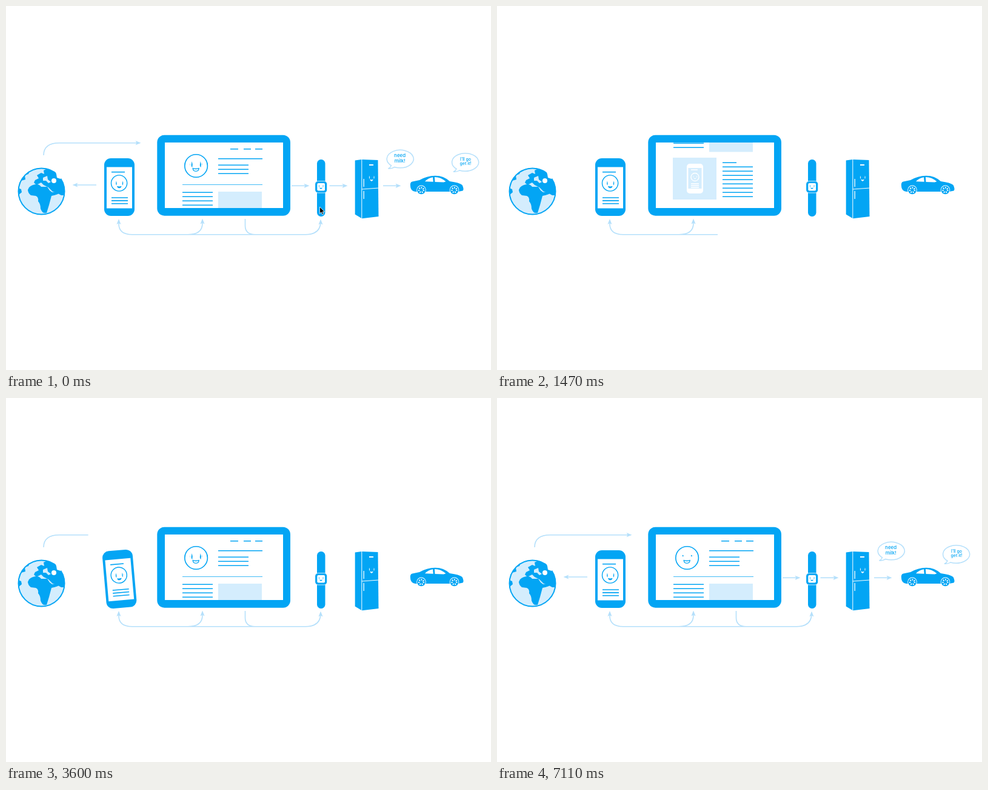
An HTML page that plays this animation: 800x600 px, repeating every 7.14 s.

```html
<!DOCTYPE html>
<html lang="en">
<head>
<meta charset="utf-8">
<title>Connected devices</title>
<style>
  html, body { margin: 0; width: 100%; height: 100%; overflow: hidden; background: #fff; }
  svg { display: block; width: 100vw; height: 100vh; }
  .b { fill: #03a5f4; }
  .p { fill: #d4edfd; }
  .w { fill: #fff; }
  .l { fill: none; stroke: #03a5f4; stroke-width: 1.6; }
  .wl { fill: none; stroke: #fff; stroke-width: 1.3; }
  .a { fill: none; stroke: #b5e0fb; stroke-width: 1.6; }
  .h { fill: #b5e0fb; }
  text { font-family: Inter, "Open Sans", sans-serif; font-weight: 500; fill: #03a5f4; text-anchor: middle; }
</style>
</head>
<body>
<svg viewBox="0 0 800 600">
  <defs>
    <clipPath id="globeClip"><circle cx="58.5" cy="305.5" r="38.5"/></clipPath>
    <clipPath id="screenClip"><rect x="262" y="225" width="195" height="108"/></clipPath>
    <path id="head" class="h" d="M0 0L-9 -3.6L-7 0L-9 3.6Z"/>
    <path id="mouth" d="M-5 4.2Q0 5.8 5 4.2Q4.6 8.8 0 8.8Q-4.6 8.8 -5 4.2Z"/>
    <g id="eyes">
      <path d="M-6.6 -7.5Q-4.8 -3 -6 2.8Q-8 1.6 -7.6 -2Z M7.6 -7.5Q9.4 -3 8.2 2.8Q6.2 1.6 6.6 -2Z"/>
      <path d="M-8.6 -6Q-10.4 -3 -9.2 0L-9.5 -3Z M10 -6Q11.2 -3 10.2 0L10.3 -3Z"/>
    </g>
    <g id="landA">
      <path d="M20 300L25 302L26 307L20 312Z M22 286Q28 274 40 270L37 277L31 279L32 286L25 288Z"/>
      <path d="M48 287L54 284L51 279L58 275L63 277L62 271L70 267L98 270V312L91 312L84 308L77 306L70 299L62 295L58 291L50 295L46 291Z"/>
      <path d="M38 299Q43 294 51 294Q55 294 58 298L68 298L72 304L76 307L91 306Q87 311 75 313L71 328L67 341Q60 343 57 334Q57 326 53 322Q54 315 49 313L41 312Q36 308 36 303Z"/>
      <path class="p" d="M61 283L68 280L69 286L74 290L70 292L66 288L61 288Z"/>
    </g>
    <g id="landB">
      <path d="M25 290Q34 267 58 266L75 269L79 275L71 278L68 284Q70 294 78 298L88 303L96 310Q90 319 77 323Q64 331 48 327Q42 322 46 317Q55 318 61 312Q66 305 62 300L55 296L53 291Q55 299 50 303Q45 309 42 315Q39 310 43 304Q47 299 46 294L41 291Q40 300 37 304L32 302L33 294L28 296Z"/>
      <path d="M18 319Q27 317 29 323Q34 330 41 331L47 337V346H18Z M82 329L92 321L90 334L80 342Z"/>
    </g>
  </defs>

  <g id="globe">
    <circle class="p" cx="58.5" cy="305.5" r="38"/>
    <g clip-path="url(#globeClip)"><g id="land" class="b">
      <use href="#landA"/><use href="#landB" x="-90"/><use href="#landA" x="-180"/>
    </g></g>
    <circle class="l" cx="58.5" cy="305.5" r="38" style="stroke-width:2"/>
    <circle class="w" cx="79" cy="288" r="4"/>
    <path class="w" d="M79 267L83 277L84 283L90 285L95 281Z"/>
  </g>

  <g id="phone">
    <rect class="b" x="162" y="251" width="50" height="95" rx="11"/>
    <rect class="w" x="166" y="265.5" width="42" height="68"/>
    <path class="l" d="M174 273.7H196"/>
    <path id="ring" class="l" style="stroke-width:1.4" pathLength="100" d="M173.5 292a13.1 13.1 0 0 1 26.2 0a13.1 13.1 0 0 1 -26.2 0"/>
    <g class="b" transform="translate(186.8 293.7) scale(.74)"><use id="phoneEyes" href="#eyes"/><use href="#mouth"/></g>
    <path id="phoneText" class="l"/>
  </g>

  <rect class="b" x="249.3" y="212.7" width="219.7" height="133" rx="12"/>
  <rect class="w" x="262" y="225" width="195" height="108"/>
  <g clip-path="url(#screenClip)"><g id="page">
    <path class="l" d="M370 235.8H383M392 235.8H404M411 235.8H423M350 251.7H423"/>
    <circle class="l" cx="313.6" cy="263.5" r="18.8"/>
    <g transform="translate(313.2 263.5)" class="b">
      <use id="tabletEyes" href="#eyes"/>
      <use href="#mouth" style="fill:#fff;stroke:#03a5f4;stroke-width:1.3"/>
    </g>
    <path id="pageText" class="l"/>
    <path class="l" d="M291 294.5H423" style="stroke-width:1;opacity:.75"/>
    <rect class="p" x="350" y="306" width="72" height="36.5"/>
    <rect class="p" x="290" y="352" width="72" height="69"/>
    <rect class="w" x="313" y="362" width="27" height="49" rx="5"/>
    <rect class="p" x="315.5" y="369" width="22" height="34"/>
    <circle class="wl" cx="326.5" cy="384" r="6.5"/>
    <g class="w" transform="translate(326.5 384) scale(.38)"><use href="#eyes"/><use href="#mouth"/></g>
    <path class="wl" d="M320 372H331M320 395H333M320 398H333M320 401H333"/>
  </g></g>

  <rect class="b" x="513" y="253" width="13.5" height="94" rx="6.5"/>
  <rect class="b" x="509.7" y="288.7" width="20" height="19.3" rx="5" stroke="#fff" stroke-width=".8"/>
  <rect class="w" x="513.3" y="292" width="12.8" height="12.6" rx="2"/>
  <g class="b" transform="translate(519.5 297.6) scale(.46)"><use id="watchEyes" href="#eyes"/><use href="#mouth"/></g>

  <g id="fridge">
    <path class="b" d="M575.7 254.5L586.5 253L613.5 254L614.5 347L587 350.3L575.7 343.5Z"/>
    <path class="wl" d="M586.8 253V350.5M587 302L615 300" style="stroke-width:1"/>
    <path class="wl" d="M590.2 285V298M590.2 305V318"/>
    <rect class="w" x="599" y="261" width="7" height="2"/>
    <g class="w" transform="translate(603 283.5) scale(.52)">
      <use id="fridgeEyes" href="#eyes"/>
      <path d="M-5 4Q0 8 5 4Q4 10 0 10Q-4 10 -5 4Z"/>
    </g>
  </g>

  <g id="car">
    <path class="b" d="M667 297Q666 290.5 670 289.5L682 287Q694 280 708 279.7Q722 279.7 732 289Q748 291 752.5 295Q756 302 753.5 304.5L746 306H675Q667 304.5 667 297Z"/>
    <path class="w" d="M691 289.3Q696 283.5 704 282.2L704.7 289.8Z M707 282Q717 282 725.5 289.3L722 290.5L707.5 290Z"/>
    <g id="wheels"></g>
  </g>

  <g id="arrows"></g>

  <g id="needMilk">
    <path class="w" stroke="#b5e0fb" stroke-width="1.5" d="M635.5 263Q634 266.5 630.5 268Q637 268.3 640.5 265.5Q645 266.8 650 266.8A22 14.7 0 1 0 635.5 263Z"/>
    <text x="649.7" y="249.3" font-size="8">need</text>
    <text x="649.7" y="258.3" font-size="8">milk!</text>
  </g>
  <g id="getIt">
    <path class="w" stroke="#b5e0fb" stroke-width="1.5" d="M743 268.5Q741.5 272 738 273.3Q744.5 273.6 748 271Q752.5 272.2 757.5 272.2A22 14.7 0 1 0 743 268.5Z"/>
    <text x="758" y="255" font-size="7">I'll go</text>
    <text x="758" y="262" font-size="7">get it!</text>
  </g>
  <path id="cursor" d="M0 0V11.2L2.6 8.8L4.3 12.8L6.2 12L4.5 8.2H8Z" stroke="#fff" stroke-width=".8"/>
</svg>
<script>
const LOOP = 7140, RESET = 60;
const $ = id => document.getElementById(id);
const clamp = v => Math.min(1, Math.max(0, v));
const part = (t, from, to) => clamp((t - from) / (to - from));
const smooth = p => (1 - Math.cos(Math.PI * p)) / 2;
const easeOut = p => 1 - (1 - p) ** 4;
const set = (id, value) => $(id).setAttribute('transform', value);
const show = (id, on) => $(id).setAttribute('visibility', on ? 'visible' : 'hidden');

function track(t, keys) {
  for (let i = 1; i < keys.length; i++) {
    const [t0, v0] = keys[i - 1], [t1, v1] = keys[i];
    if (t <= t1) return v0 + (v1 - v0) * part(t, t0, t1);
  }
  return keys[keys.length - 1][1];
}

const row = (x, y, w) => `M${x} ${y}h${w}`;
const rows = (x, y, w, n) => Array.from({ length: n }, (_, i) => row(x, y + i * 7, w)).join('');
$('pageText').setAttribute('d',
  rows(350, 262.3, 50, 3) + rows(291, 307.3, 50, 5) + row(372, 360.3, 23) + rows(372, 367.3, 50, 8));

$('wheels').innerHTML = [685, 739.5].map(x => `<g transform="translate(${x} 303.3)">
  <circle class="w" r="7.8"/><circle class="b" r="6.9"/>
  <circle r="3.8" fill="none" stroke="#fff" stroke-width="2.6" stroke-dasharray="1.6 1.81"/></g>`).join('');

// Each arrow: line, heads [x, y, angle], and the reveal edge over time.
const ARROWS = [
  { d: 'M186 355V359Q186 376.7 208 376.7H300Q324 376.7 324 358V355M300 376.7H494Q519 376.7 519 355M394.5 351V362Q394.5 376.7 411 376.7',
    heads: [[186, 351, -90], [324, 350.5, -90], [519, 351.5, -90]],
    from: 170, keys: [[60, 180], [660, 276], [1470, 364], [2100, 430], [2860, 528]] },
  { d: 'M62 246Q62 225.7 88 225.7H218', heads: [[222.5, 225.7, 0]],
    from: 55, keys: [[2950, 60], [3600, 135.5], [4320, 226]] },
  { d: 'M149 295H114', heads: [[109.5, 295, 180]],
    from: 151, keys: [[3960, 150], [4310, 108]] },
  { d: 'M471 296.3H496', heads: [[500.5, 296.3, 0]],
    from: 468, keys: [[4360, 470], [4690, 502]] },
  { d: 'M533.5 296.3H559', heads: [[563.5, 296.3, 0]],
    from: 531, keys: [[4700, 532], [5030, 565]] },
  { d: 'M622 296.3H647', heads: [[651.5, 296.3, 0]],
    from: 620, keys: [[5070, 621], [5400, 653]] }
];
$('arrows').innerHTML = ARROWS.map((a, i) => `
  <clipPath id="cut${i}"><rect y="215" height="175"/></clipPath>
  <g clip-path="url(#cut${i})"><path class="a" d="${a.d}"/>
  ${a.heads.map(([x, y, r]) => `<use href="#head" transform="translate(${x} ${y}) rotate(${r})"/>`).join('')}</g>`).join('');
const cuts = ARROWS.map((_, i) => document.querySelector(`#cut${i} rect`));

const BLINKS = {
  tabletEyes: [5160, 7115],
  phoneEyes: [4440, 6180],
  watchEyes: [1800, 2520],
  fridgeEyes: [1020, 4620]
};

function popBubble(id, x, y, p) {
  show(id, p > 0);
  set(id, `translate(${x} ${y}) scale(${easeOut(p)}) translate(${-x} ${-y})`);
}

function draw(t) {
  const done = t < RESET;
  const s = done ? LOOP : t;

  ARROWS.forEach((a, i) => {
    const edge = track(s, a.keys), start = s < a.keys[0][0] ? edge : a.from;
    cuts[i].setAttribute('x', Math.min(start, edge));
    cuts[i].setAttribute('width', Math.abs(edge - start));
  });

  for (const id in BLINKS) {
    const open = Math.min(...BLINKS[id].map(at => clamp(Math.abs(t - at) / 90)));
    set(id, `translate(0 -4) scale(1 ${.25 + .75 * open}) translate(0 4)`);
  }

  const spin = 180 * smooth(part(t, 60, 1260));
  set('land', `translate(${spin} 0)`);
  const hop = Math.abs(Math.sin(part(t, 1920, 2640) * Math.PI * 2));
  set('globe', `translate(0 ${-2 * hop})`);

  const scroll = 102 * (smooth(part(t, 145, 965)) - smooth(part(t, 1600, 2380)));
  set('page', `translate(0 ${-scroll})`);

  const ring = done ? 100 : 100 * part(t, 60, 860);
  $('ring').style.strokeDasharray = ring >= 100 ? 'none' : `${ring} 100`;
  $('phoneText').setAttribute('d', [0, 1, 2].map(i => {
    const p = done ? 1 : part(t, 270 + i * 90, 930 + i * 90);
    return p ? row(174, 316 + i * 4.9, 27 * p) : '';
  }).join(''));

  // Two full swings, the first one peaking to the left.
  const angle = -5 * Math.sin(part(t, 3510, 4230) * Math.PI * 4);
  set('phone', `rotate(${angle} 186.8 296)`);

  popBubble('needMilk', 629, 268.5, part(s, 5370, 5790));
  popBubble('getIt', 737, 273.5, part(s, 6330, 6750));

  const move = smooth(part(t, 30, 480));
  show('cursor', t < 960);
  set('cursor', `translate(${517.5 - 37.5 * move} ${331 + 61.5 * move})`);
}

const begin = performance.now();
function tick(now) {
  draw(Math.max(0, now - begin) % LOOP);
  requestAnimationFrame(tick);
}
draw(0);
requestAnimationFrame(tick);
</script>
</body>
</html>
```
